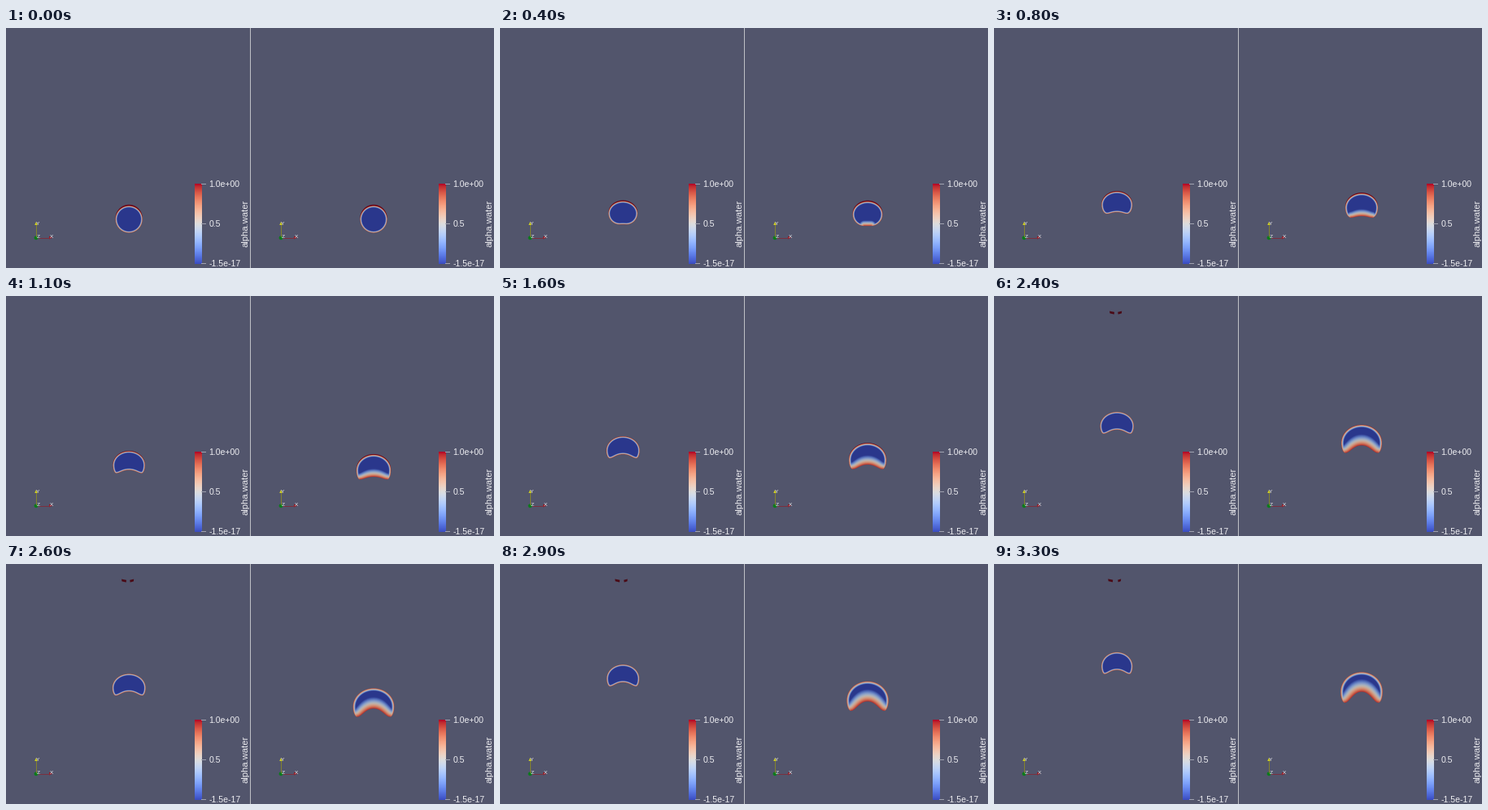
These frames come from a looping animation (600x296 px, 3400 ms). A matplotlib script:

```python
import matplotlib.pyplot as plt
import numpy as np
from matplotlib.animation import FuncAnimation
from matplotlib.patches import Circle, Polygon, Rectangle
from matplotlib.path import Path

W, H, DPI = 600, 296, 100
FRAMES, STEP = 34, 100
BG = np.array([82, 85, 108]) / 255
MAROON = np.array([105, 6, 24]) / 255
WHITE = "#ececf0"
PATCH_W, PATCH_H, SS = 64, 56, 2
COOLWARM = plt.get_cmap("coolwarm")


def smooth(u):
    u = np.clip(u, 0, 1)
    return u * u * (3 - 2 * u)


def rise(t, speed, lag):
    """Top edge: starts at rest, then approaches a constant speed."""
    return 219.4 - speed * (t - lag * (1 - np.exp(-t / lag)))


def sharp(t):
    """Bubble with a thin interface; settles into a steady cap."""
    return dict(top=rise(t, 38, .39),
                half=16.6 + 4.2 * np.sin(np.pi / 2 * t / 2.1),
                height=27 + 6.2 * np.exp(-t / .3),
                dent=5 * smooth((t - .3) / 1.1),
                shade=max(0, 1.6 - .9 * t), rim=2.1, blur=2.1)


def diffuse(t):
    """Slower bubble whose floor smears out and keeps bending."""
    return dict(top=rise(t, 28.5, .28),
                half=16.6 + 9.3 * np.sin(np.pi / 2 * t / 3.3),
                height=26 + 3.6 * t + 7.2 * np.exp(-t / .4),
                dent=4.7 * max(0, t - .4),
                shade=max(0, 1.6 - .6 * t), rim=2.1 + .45 * t,
                blur=2.1 + 7.6 * np.sqrt(t))


def outline(t, top, half, height, dent):
    """Dome with rounded lobes, and the dented floor between them."""
    low = top + height
    side = top + height * (.5 + .14 * smooth(t / 1.4))
    lobe = .79 * half * smooth(t / 1.1)
    a = np.linspace(0, np.pi, 33)
    dome = np.c_[half * np.cos(a), side - (side - top) * np.sin(a)]
    b = np.linspace(0, np.pi / 2, 9)
    flank = np.c_[lobe + (half - lobe) * np.sin(b), side + (low - side) * np.cos(b)]
    shell = np.vstack([flank, dome[1:-1], flank[::-1] * [-1, 1]])
    u = np.linspace(-1, 1, 21)
    bulge = np.sin(np.pi / 2 * np.abs(u) ** 2.1)
    return shell, np.c_[lobe * u, low - dent * (1 - bulge)]


def distance(pts, line):
    a, d = line[:-1], np.diff(line, axis=0)
    rx = pts[:, :1] - a[:, 0]
    ry = pts[:, 1:] - a[:, 1]
    k = np.clip((rx * d[:, 0] + ry * d[:, 1]) / ((d ** 2).sum(1) + 1e-9), 0, 1)
    return np.sqrt(((rx - k * d[:, 0]) ** 2 + (ry - k * d[:, 1]) ** 2).min(1))


def coverage(pts, shell, floor):
    up, down = distance(pts, shell), distance(pts, floor)
    inside = Path(np.vstack([shell, floor])).contains_points(pts)
    signed = np.where(inside, 1, -1) * np.minimum(up, down)
    return np.clip(signed * SS + .5, 0, 1)[:, None], up, down


def lit(level):
    """Colour map dimmed by the scene light, most at the gas end."""
    return COOLWARM(level)[:, :3] * (.73 + .17 * level[:, None])


def bubble(t, cx, top, half, height, dent, shade, rim, blur):
    x0, y0 = int(cx) - PATCH_W // 2, int(top) - 7
    xs = x0 - cx + (np.arange(PATCH_W * SS) + .5) / SS
    ys = y0 + (np.arange(PATCH_H * SS) + .5) / SS
    pts = np.stack(np.meshgrid(xs, ys), -1).reshape(-1, 2)
    shell, floor = outline(t, top, half, height, dent)
    cover, up, down = coverage(pts, shell, floor)

    spread = rim + (blur - rim) * (1 - .4 * np.clip(pts[:, 0] / half, -1, 1) ** 2)
    level = np.clip(np.maximum(.92 * (1 - up / rim), .96 * (1 - down / spread)), 0, 1)

    rgb = np.tile(BG, (len(pts), 1))
    if shade > .05:
        rgb += (MAROON - rgb) * coverage(pts + [0, shade], shell, floor)[0]
    rgb += (lit(level) - rgb) * cover
    rgb = rgb.reshape(PATCH_H, SS, PATCH_W, SS, 3).mean((1, 3))
    return np.clip(rgb, 0, 1), (x0, x0 + PATCH_W, y0 + PATCH_H, y0)


fig = plt.figure(figsize=(W / DPI, H / DPI), dpi=DPI, facecolor=BG)
ax = fig.add_axes([0, 0, 1, 1])
ax.axis("off")


def box(x, y, w, h, color):
    ax.add_patch(Rectangle((x, y), w, h, fc=color, ec="none", antialiased=False))


def shape(points, color):
    return ax.add_patch(Polygon(points, fc=color, ec="none"))


def label(x, y, s, size, **kw):
    ax.text(x, y, s, color=WHITE, fontsize=size * 72 / DPI,
            family="Liberation Sans", **kw)


def legend(x):
    ax.imshow(np.linspace(1, 0, 256)[:, None], cmap=COOLWARM, aspect="auto",
              extent=(x + 231.5, x + 240, 291, 192), interpolation="nearest")
    for i, s in enumerate(("1.0e+00", "0.5", "-1.5e-17")):
        box(x + 240, 192 + 49 * i, 6, 1, "#a0a2b0")
        label(x + 249.5, 195.6 + 49.4 * i, s, 10.5)
    label(x + 297.4, 269.5, "alpha.water", 11.3, rotation=90,
          rotation_mode="anchor")


def triad(x):
    ax.plot([x + 37, x + 37], [243, 257], color="#85852e", lw=.7)
    ax.plot([x + 40, x + 54], [258.6, 258.6], color="#7c2f3e", lw=.7)
    shape([(x + 35.2, 243), (x + 38.8, 243), (x + 37, 239)], "#d0d022")
    shape([(x + 53, 256.8), (x + 53, 260.6), (x + 57, 258.7)], "#a0141c")
    ax.add_patch(Circle((x + 37, 258.8), 2.4, fc="#0c7a1c", ec="none"))
    for dx, y, s in ((36.8, 242.6, "Y"), (53.8, 259, "X"), (38.2, 259, "Z")):
        label(x + dx, y, s, 6.5)


for left in (0, 300):
    legend(left)
for left in (0, 301):
    triad(left)
box(300, 0, 1, H, "#bfc0c6")

views = [(sharp, 151.2), (diffuse, 452.0)]
images = [ax.imshow(np.tile(BG, (PATCH_H, PATCH_W, 1)), aspect="auto",
                    interpolation="nearest") for _ in views]
shards = [shape([(0, 0), (1, 0), (1, 1)], "#4a0a16") for _ in range(2)]


def draw(n):
    t = n * STEP / 1000
    for im, (state, cx) in zip(images, views):
        rgb, extent = bubble(t, cx, **state(t))
        im.set_data(rgb)
        im.set_extent(extent)
    ax.set_xlim(0, W)
    ax.set_ylim(H, 0)

    # Droplets left at the upper boundary
    k = smooth((t - 2.6) / .7)
    for s, x, w, tilt in zip(shards, (142 - 1.8 * k, 152.2), (6, 5 - k), (.6, -.6)):
        y = 20.6 - .2 * k
        s.set_xy([(x, y - 1.4 - tilt), (x + w, y - 1.4 + tilt),
                  (x + w - .3, y + 1.4 + tilt), (x + .5, y + 1.4 - tilt)])
        s.set_visible(n >= 23)
    return [*images, *shards]


anim = FuncAnimation(fig, draw, frames=FRAMES, interval=STEP, repeat=True,
                     repeat_delay=0, blit=False)
plt.show()
```
